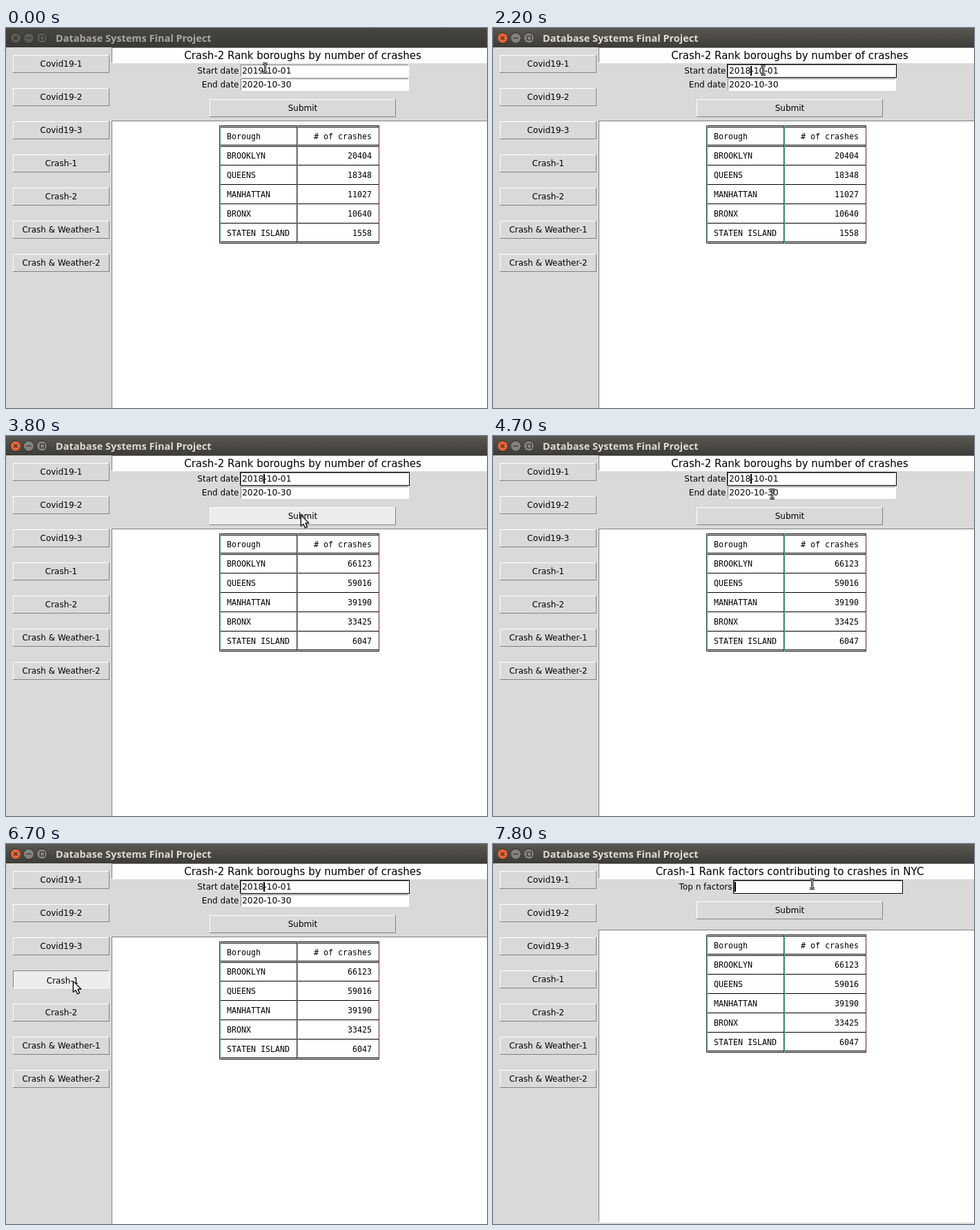
Write an HTML page with a canvas that moves like this. It is 697 px wide and 550 px high and loops after 8000 ms.

```html
<!DOCTYPE html>
<html lang="en">
<head>
<meta charset="utf-8">
<title>Database Systems Final Project</title>
<style>
html, body { margin: 0; width: 100%; height: 100%; overflow: hidden; background: #d9d9d9; }
canvas { display: block; }
</style>
</head>
<body>
<canvas id="stage" width="697" height="550"></canvas>
<script>
const LOOP = 8000, STEP = 100;
const g = document.getElementById('stage').getContext('2d', { alpha: false });

const BG = '#d9d9d9', HOVER = '#ececec', SHADE = '#828282';
const UI = '12px "DejaVu Sans", sans-serif';
const FIELD = '12.3px "DejaVu Sans", sans-serif';
const HEAD = '15px "DejaVu Sans", sans-serif';
const MONO = '11.63px "DejaVu Sans Mono", monospace';
const BAR = 'bold 14.5px "Open Sans", "Noto Sans", sans-serif';

const MENU = ['Covid19-1', 'Covid19-2', 'Covid19-3', 'Crash-1', 'Crash-2',
  'Crash & Weather-1', 'Crash & Weather-2'];
const AREAS = ['BROOKLYN', 'QUEENS', 'MANHATTAN', 'BRONX', 'STATEN ISLAND'];
const BEFORE = [20404, 18348, 11027, 10640, 1558];
const AFTER = [66123, 59016, 39190, 33425, 6047];

// pointer: time, x, y
const PATH = [
  [0, 375, 58], [100, 375, 58], [500, 391, 61], [2800, 391, 61],
  [2900, 427, 114], [4000, 427, 114], [4100, 429, 116], [4300, 429, 116],
  [4800, 398, 76], [5000, 398, 76], [5100, 398, 78], [5200, 398, 78],
  [5800, 171, 120], [6100, 118, 177], [6200, 112, 186], [6600, 97, 198],
  [6800, 97, 198], [6900, 200, 178], [7000, 345, 133], [7100, 468, 103],
  [7400, 466, 84], [7600, 463, 64], [7800, 462, 58], [8000, 462, 58]
];
// the caret flips at each of these times, starting hidden
const BLINK = [100, 700, 1000, 1600, 1900, 3500, 3800, 4400, 4700,
  5300, 5600, 6200, 6500, 6800, 7700];
const DATES = [[0, '2019-10-01', 4], [1400, '201-10-01', 3], [2200, '2018-10-01', 4]];

const within = (t, a, b) => t >= a && t < b;
const inBox = (p, x, y, w, h) => within(p.x, x, x + w) && within(p.y, y, y + h);

function pointerAt(t) {
  const i = PATH.findIndex(p => p[0] > t);
  const [t0, x0, y0] = PATH[i - 1], [t1, x1, y1] = PATH[i];
  const k = (t - t0) / (t1 - t0);
  return { x: Math.round(x0 + (x1 - x0) * k), y: Math.round(y0 + (y1 - y0) * k) };
}

function rect(x, y, w, h, color) {
  g.fillStyle = color;
  g.fillRect(x, y, w, h);
}

function text(s, x, y, font = UI, align = 'left', color = '#000') {
  g.font = font;
  g.textAlign = align;
  g.fillStyle = color;
  g.fillText(s, x, y);
}

function bevel(x, y, w, h, fill, light, dark) {
  rect(x, y, w, h, dark);
  rect(x, y, w - 1, h - 1, light);
  rect(x + 1, y + 1, w - 2, h - 2, fill);
}

function button(label, x, y, w, pointer, pressed) {
  const over = inBox(pointer, x, y, w, 26);
  const down = over && pressed;
  bevel(x, y, w, 26, over ? HOVER : BG, down ? SHADE : '#fff', down ? '#fff' : SHADE);
  const d = down ? 2 : 0;
  text(label, x + w / 2 + d, y + 17 + d, UI, 'center');
}

function entry(x, y, value, focused) {
  rect(x, y, 246, 20, focused ? '#000' : BG);
  bevel(x + 1, y + 1, 244, 18, '#fff', SHADE, '#fff');
  text(value, x + 3, y + 14, FIELD);
}

function titleBar(active) {
  const fade = g.createLinearGradient(0, 0, 0, 28);
  fade.addColorStop(0, active ? '#5a584f' : '#474640');
  fade.addColorStop(1, active ? '#3c3b37' : '#3a3935');
  rect(0, 0, 697, 28, fade);
  text('Database Systems Final Project', 72, 20, BAR, 'left', active ? '#dfdbd2' : '#aaa79f');
  [14, 33, 52].forEach((x, i) => {
    g.beginPath();
    g.arc(x, 14.5, 7.5, 0, 7);
    g.fillStyle = !active ? '#5b5a54' : i ? '#84827a' : '#e9633a';
    g.fill();
    g.strokeStyle = '#32312d';
    g.lineWidth = 1;
    g.stroke();
    g.beginPath();
    if (i === 0) {
      g.moveTo(x - 2.5, 12); g.lineTo(x + 2.5, 17);
      g.moveTo(x + 2.5, 12); g.lineTo(x - 2.5, 17);
    } else if (i === 1) {
      g.moveTo(x - 3.5, 14.5); g.lineTo(x + 3.5, 14.5);
    } else {
      g.rect(x - 2.5, 11.5, 6, 6);
    }
    g.lineWidth = 1.2;
    g.stroke();
  });
}

function table(top, counts) {
  for (let i = 0; i < 7; i++) {
    const y = top + i * 28;
    if (i < 2 || i === 6) {
      rect(309, y - 1, 232, 1, '#000');
      rect(309, y + 1, 232, 1, '#000');
    } else {
      rect(309, y, 232, 1, '#000');
    }
  }
  for (const x of [309, 421]) {
    rect(x, top - 1, 1, 171, '#2a3c38');
    rect(x + 1, top - 1, 1, 171, '#6fb8a2');
  }
  rect(540, top - 1, 1, 171, '#6e2036');
  const row = (i, name, n) => {
    const y = top + 19 + i * 28;
    text(name, 320, y, MONO);
    text(n, 530, y, MONO, 'right');
  };
  row(0, 'Borough', '# of crashes');
  AREAS.forEach((name, i) => row(i + 1, name, counts[i]));
}

function outline(shape, x, y, strokes) {
  g.save();
  g.translate(x, y);
  g.lineJoin = 'round';
  for (const [color, width] of strokes) {
    g.strokeStyle = color;
    g.lineWidth = width;
    g.stroke(shape);
  }
  g.restore();
}

const ARROW = new Path2D('M.5 1V16.2L4 13L6.6 18.8L9.3 17.6L6.8 11.9H11.5Z');
const BEAM = new Path2D('M-3 -6.5H-1L.5 -5.5L2 -6.5H4M.5 -5.5V5.5M-3 6.5H-1L.5 5.5L2 6.5H4');

function pointer(p, beam) {
  if (beam) {
    outline(BEAM, p.x, p.y, [['#000', 3], ['#fff', 1]]);
    return;
  }
  outline(ARROW, p.x, p.y, [['#000', 1.6]]);
  g.save();
  g.translate(p.x, p.y);
  g.fillStyle = '#fff';
  g.fill(ARROW);
  g.restore();
  outline(ARROW, p.x, p.y, [['#000', 1]]);
}

function draw(t) {
  const p = pointerAt(t);
  const factors = t >= 6800;
  const pressed = within(t, 3300, 3500) || within(t, 6700, 6800);
  const caret = BLINK.filter(b => b <= t).length % 2 === 1;

  rect(0, 0, 697, 550, BG);
  titleBar(t >= 100);
  MENU.forEach((label, i) => button(label, 10, 39 + i * 48, 140, p, pressed));

  bevel(153, 28, 560, 23, '#fff', SHADE, '#fff');
  text(factors ? 'Crash-1 Rank factors contributing to crashes in NYC'
    : 'Crash-2 Rank boroughs by number of crashes', 430, 45, HEAD, 'center');

  let overField;
  if (factors) {
    text('Top n factors', 346.5, 66, UI, 'right');
    entry(348, 52, '', t >= 7700);
    if (caret) rect(350, 55, 2, 14, '#000');
    overField = inBox(p, 349, 53, 244, 18);
  } else {
    const [, date, at] = DATES.filter(d => d[0] <= t).pop();
    text('Start date', 337.5, 66, UI, 'right');
    text('End date', 337.5, 86, UI, 'right');
    entry(339, 52, date, t >= 100);
    entry(339, 72, '2020-10-30', false);
    if (caret) rect(341 + at * 8, 55, 2, 14, '#000');
    overField = inBox(p, 340, 53, 244, 38);
  }
  button('Submit', 295, factors ? 83 : 103, 270, p, pressed);

  const top = factors ? 124 : 134;
  bevel(153, top, 560, (factors ? 548 : 560) - top, '#fff', SHADE, '#fff');
  table(top + 8, t < 3500 ? BEFORE : AFTER);
  pointer(p, overField);
}

const start = performance.now();
function tick() {
  const t = (performance.now() - start) % LOOP;
  draw(Math.floor(t / STEP) * STEP);
  requestAnimationFrame(tick);
}
tick();
</script>
</body>
</html>
```
